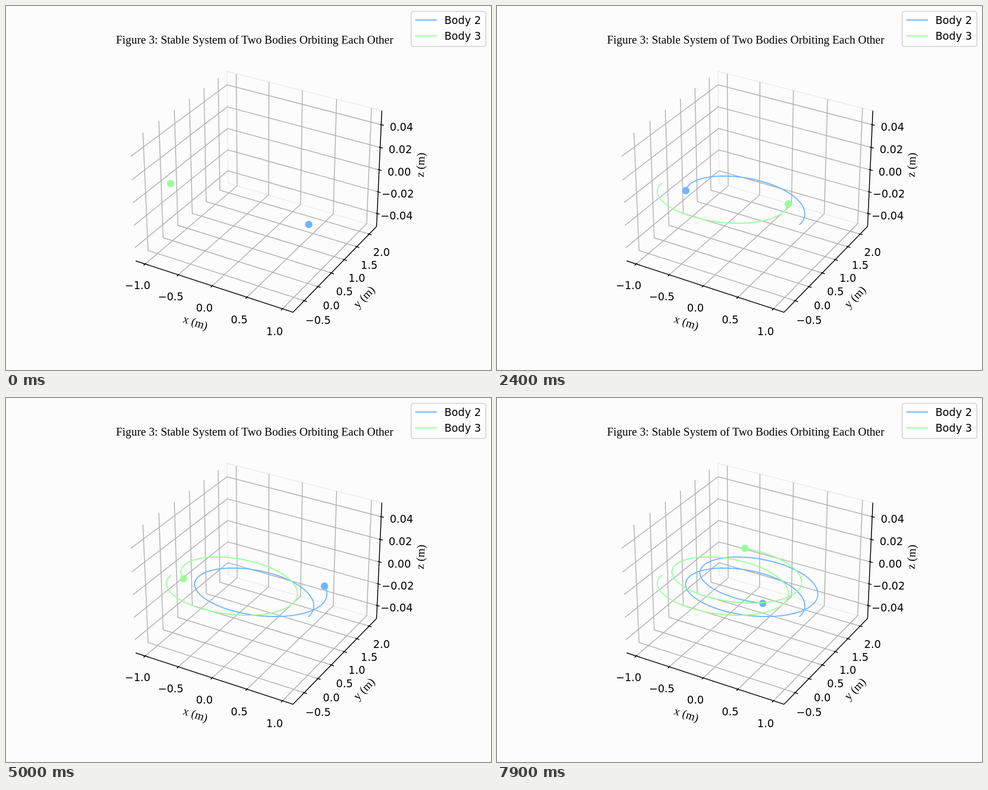
An HTML page for the animation above (8 s loop, 864 by 648 pixels).

```html
<!DOCTYPE html>
<html lang="en">
<head>
<meta charset="utf-8">
<title>Two-body orbit</title>
<style>
  html, body { margin: 0; width: 100%; height: 100%; overflow: hidden; background: #fcfcfc; }
  svg { display: block; }
  text { fill: #000; }
  .sans { font: 18.75px "DejaVu Sans", sans-serif; }
  .serif { font: 20.5px "Liberation Serif", "Times New Roman", serif; text-anchor: middle; }
  .tick { text-anchor: middle; }
  path { fill: none; }
  .pane { stroke: #ebebeb; stroke-width: 1.6; }
  .grid { stroke: #b0b0b0; stroke-width: 1.5; }
  .axis { stroke: #000; stroke-width: 1.5; }
  .trail { stroke-width: 1.875; stroke-linejoin: round; stroke-linecap: square; }
</style>
</head>
<body>
<svg id="stage" width="864" height="648" viewBox="0 0 864 648"></svg>
<script>
const BLUE = '#6eb4ff', GREEN = '#99ff99';
const LOOP = 8000, STEP = 100, SUB = 4;
const svg = document.getElementById('stage');

function add(tag, attrs, text) {
  const el = document.createElementNS('http://www.w3.org/2000/svg', tag);
  for (const k in attrs) el.setAttribute(k, attrs[k]);
  if (text) el.textContent = text;
  return svg.appendChild(el);
}

// Perspective camera: elevation 30, azimuth -60, distance 10.
const S3 = Math.sqrt(3) / 2;
function project([x, y, z]) {
  const depth = 10 - (S3 / 2 * x - 0.75 * y + 0.5 * z);
  const right = S3 * x + 0.5 * y;
  const up = -0.25 * x + S3 / 2 * y + S3 * z;
  return [449.5 + 2697 * right / depth, 320.5 - 2697 * up / depth];
}
const toPath = pts => 'M' + pts.map(p => project(p).map(v => v.toFixed(2)).join(' ')).join('L');
const line = (cls, ...pts) => add('path', { class: cls, d: toPath(pts) });

// Data units to box units
const wx = x => 0.5195 * x;
const wy = y => 0.3708 * y - 0.2617;
const wz = z => 8.571 * z;
const H = 0.59525, HZ = 0.44644;

const xs = [-1, -0.5, 0, 0.5, 1];
const ys = [-0.5, 0, 0.5, 1, 1.5, 2];
const zs = [-0.04, -0.02, 0, 0.02, 0.04];
const OUT = 0.019, IN = 0.0095;

line('pane', [-H, H, -HZ], [-H, H, HZ], [H, H, HZ], [H, H, -HZ], [-H, H, -HZ]);

xs.map(wx).forEach(x => line('grid', [x, -H, -HZ], [x, H, -HZ], [x, H, HZ]));
ys.map(wy).forEach(y => line('grid', [H, y, -HZ], [-H, y, -HZ], [-H, y, HZ]));
zs.map(wz).forEach(z => line('grid', [-H, -H, z], [-H, H, z], [H, H, z]));

line('axis', [-H, -H, -HZ], [H, -H, -HZ], [H, H, -HZ], [H, H, HZ]);
xs.map(wx).forEach(x => line('axis', [x, -H - OUT, -HZ], [x, -H + IN, -HZ]));
ys.map(wy).forEach(y => line('axis', [H - IN, y, -HZ], [H + OUT, y, -HZ]));
zs.map(wz).forEach(z => line('axis', [H - IN, H, z], [H + OUT, H, z]));

function tickLabels(values, digits, spots) {
  values.forEach((v, i) => {
    const [x, y] = spots[i];
    add('text', { class: 'sans tick', x, y: y + 6.8 }, v.toFixed(digits).replace('-', '\u2212'));
  });
}
tickLabels(xs, 1, [[234.5, 497], [293.5, 517], [353.5, 537], [415.5, 558], [478.5, 579]]);
tickLabels(ys, 1, [[556, 559], [579.5, 533], [603, 508], [625, 484.5], [647, 461], [669, 438]]);
tickLabels(zs, 2, [[696, 373], [698, 334], [700.5, 295], [702.5, 255], [704.5, 215]]);

function axisLabel(text, x, y, angle) {
  add('text', { class: 'serif', y: 5, transform: `translate(${x} ${y}) rotate(${angle})` }, text);
}
axisLabel('x (m)', 337, 565, 18);
axisLabel('y (m)', 639, 519, -46);
axisLabel('z (m)', 740, 283, -87.4);
add('text', { class: 'serif', x: 443, y: 67 }, 'Figure 3: Stable System of Two Bodies Orbiting Each Other');

// Kepler ellipse starting at its far point, about a slowly drifting centre.
const ECC = 0.19, SEMI = 1 / (1 + ECC), RATE = 1.4138;
function bodyAt(t, side) {
  const mean = RATE * t;
  let E = mean;
  for (let i = 0; i < 6; i++) {
    E -= (E + ECC * Math.sin(E) - mean) / (1 + ECC * Math.cos(E));
  }
  const x = SEMI * (Math.cos(E) + ECC);
  const y = SEMI * Math.sqrt(1 - ECC * ECC) * Math.sin(E);
  return [wx(side * x + 0.0009 * t), wy(side * y + 0.1062 * t), 0];
}

const bodies = [[1, BLUE], [-1, GREEN]].map(([side, color]) => ({
  side,
  trail: add('path', { class: 'trail', stroke: color }),
  dot: add('circle', { r: 6.56, fill: color })
}));

add('rect', { x: 721.8, y: 9.6, width: 133, height: 62.3, rx: 3.75,
  fill: '#fff', 'fill-opacity': 0.8, stroke: '#ccc', 'stroke-opacity': 0.8, 'stroke-width': 1.875 });
[['Body 2', BLUE, 25], ['Body 3', GREEN, 53.3]].forEach(([name, color, y]) => {
  add('path', { class: 'trail', stroke: color, d: `M730 ${y}H767` });
  add('text', { class: 'sans', x: 780.9, y: y + 6.9 }, name);
});

function draw(step) {
  for (const b of bodies) {
    const pts = [];
    for (let i = 0; i <= step * SUB; i++) pts.push(bodyAt(i / SUB * STEP / 1000, b.side));
    b.trail.setAttribute('d', step ? toPath(pts) : '');
    const [cx, cy] = project(pts[pts.length - 1]);
    b.dot.setAttribute('cx', cx);
    b.dot.setAttribute('cy', cy);
  }
}

let shown = -1;
function tick() {
  const step = Math.floor(performance.now() % LOOP / STEP);
  if (step !== shown) draw(shown = step);
  requestAnimationFrame(tick);
}
tick();
</script>
</body>
</html>
```
